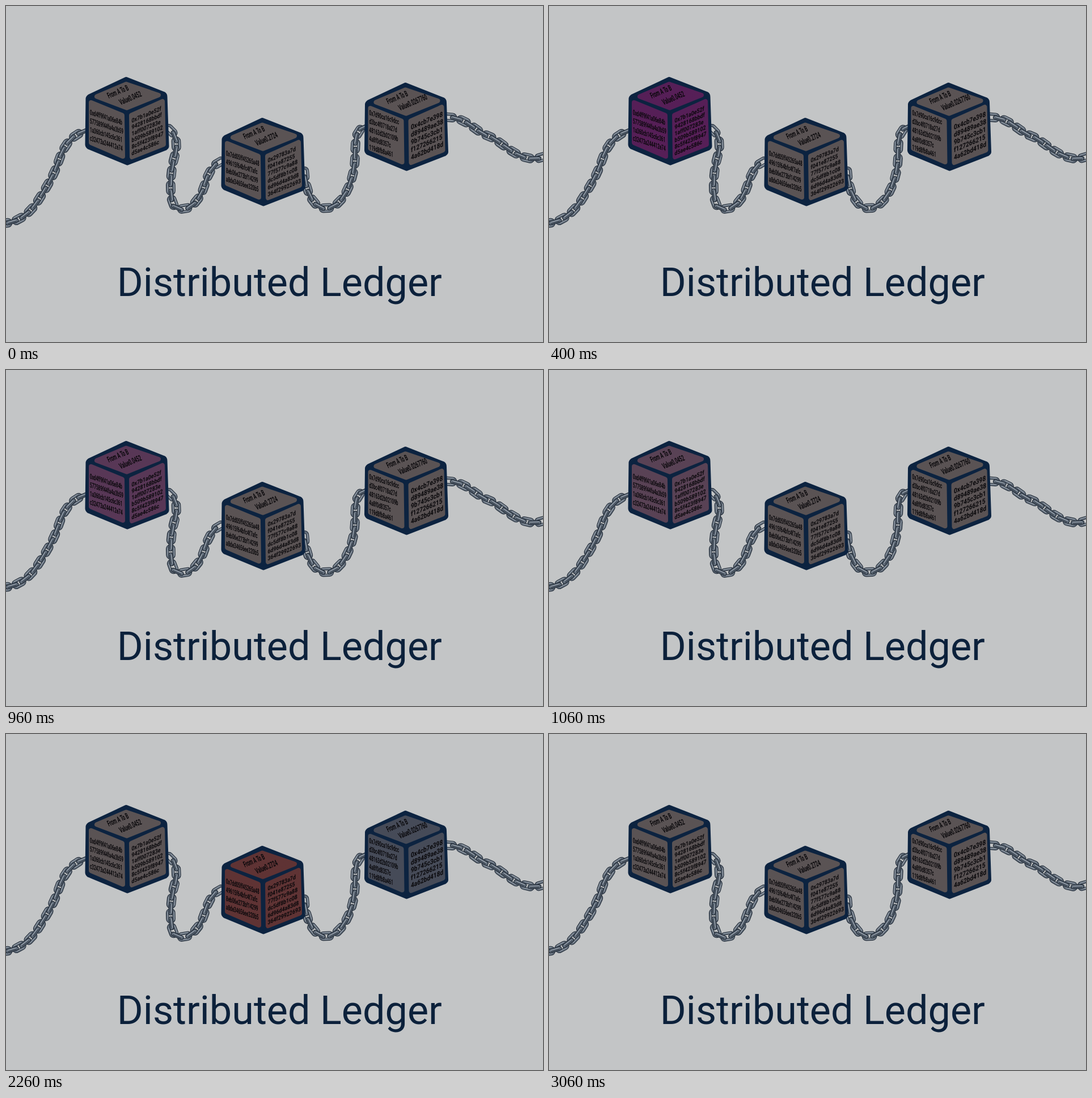
Animation of 947 by 592 pixels, one loop 3300 ms. Source, as an HTML page:

```html
<!DOCTYPE html>
<html lang="en">
<head>
<meta charset="utf-8">
<title>Distributed Ledger</title>
<style>
  html, body { margin: 0; width: 100%; height: 100%; overflow: hidden; background: #c3c5c6; }
  svg { display: block; }
  text { font-family: Roboto, sans-serif; }
  .title { font-size: 70.15px; fill: #0c213b; }
  .data { font-weight: 700; fill: #09080b; }
  .shell { fill: #0c2340; stroke: #0c2340; stroke-width: 7; stroke-linejoin: round; }
  .faces { stroke-width: 8; stroke-linejoin: round; }
  .link { fill: none; }
</style>
</head>
<body>
<svg id="stage" width="947" height="592" viewBox="0 0 947 592">
  <defs>
    <g id="flat" class="link">
      <rect x="-10.5" y="-5.6" width="21" height="11.2" rx="5" stroke="#202a36" stroke-width="5.4"/>
      <rect x="-10.5" y="-5.6" width="21" height="11.2" rx="5" stroke="#626d7a" stroke-width="3.4"/>
      <path d="M-7-6.2H7M-7 5H7" stroke="#a0a9b3"/>
    </g>
    <g id="edge">
      <rect x="-11.5" y="-3.3" width="23" height="6.6" rx="3.2" fill="#626d7a" stroke="#202a36" stroke-width="1.2"/>
      <path d="M-8-1.2H8" stroke="#a0a9b3"/>
      <path d="M-8 1.2H8" stroke="#202a36" stroke-width=".8"/>
    </g>
  </defs>
  <g id="chains"></g>
  <g id="cubes"></g>
  <text class="title" x="195.8" y="511">Distributed Ledger</text>
</svg>
<script>
const LOOP = 3300;
const GREY = [90, 83, 84];

const chains = [
  'M-8 383C24 382 44 363 59 339S84 299 93 273S114 228 143 219',
  'M286 216C303 228 302 248 297 266S289 310 291 330S297 358 313 357S343 338 350 316S366 276 386 272',
  'M526 290C528 326 542 357 565 356S606 325 613 290S608 220 636 212',
  'M776 196C812 196 826 220 850 229S895 267 930 269Q940 269 955 263'
];

// Each level step is [time in ms, strength of the glow].
const cubes = [
  {
    x: 0, y: 0, glow: [86, 26, 87],
    levels: [[200, .3], [300, .65], [400, .92], [530, 1], [860, .85], [910, .7], [960, .5], [1000, .3], [1160, 0]],
    top: ['From A To B', 'Value0.0452'],
    left: { y: 191.5, lines: ['0xd4ff9f41a06e84b', '577589f44fa4a3b59', '1a360cb145c6c361', 'c32473a244412e74'] },
    right: { y: 206, size: 10.7, pitch: 11.5,
      lines: ['0x7b1a0e52f', '9428168bbdf', '1aff007283e', 'b509b589102', '8c5f423f8947', 'd5ae4c586c'] }
  },
  {
    x: 240, y: 72, glow: [98, 29, 31],
    levels: [[1530, .1], [1560, .3], [1700, .8], [1860, 1], [2200, .8], [2260, .6], [2400, .2], [2460, 0]],
    top: ['From A To B', 'Value0.2724'],
    left: { y: 191.5, lines: ['0x7dd05ff45265a48', '49615f64bfc4f7afc', '8eb06e273bf14299', 'a8de34656ee320b5'] },
    right: { y: 204, size: 10.7, pitch: 12,
      lines: ['0x29783a7d', 'f041e87255', '77f577c9a88', 'dc5df8b1c08', '6d96d4a83d8', '364f29922693'] }
  },
  {
    x: 492.5, y: 10, glow: [39, 64, 94],
    levels: [[2200, .2], [2260, .4], [2400, .8], [2460, 1], [2930, .5], [3060, 0]],
    top: ['From A To B', 'Value0.0267760'],
    left: { y: 182, lines: ['0x7d90ca16c9dcc', 'd3bc4f0718a27d', '48163d2b02109b', '4a8f0d8357c', '119d8fb8a461'] },
    right: { y: 208, size: 12.3, pitch: 13.3,
      lines: ['0x4cb7e398', 'd89489ae38', '9b745c3cb1', 'f127266215', '4a62bd418d'] }
  }
];

function add(parent, tag, attrs, content = '') {
  const el = document.createElementNS('http://www.w3.org/2000/svg', tag);
  for (const key in attrs) el.setAttribute(key, attrs[key]);
  el.textContent = content;
  return parent.appendChild(el);
}

function drawChain(d) {
  const root = document.getElementById('chains');
  const path = add(root, 'path', { d, fill: 'none' });
  const length = path.getTotalLength();
  const place = (href, at) => {
    const p = path.getPointAtLength(at);
    const a = path.getPointAtLength(at - 4), b = path.getPointAtLength(at + 4);
    const angle = Math.atan2(b.y - a.y, b.x - a.x) * 180 / Math.PI;
    add(root, 'use', { href, transform: `translate(${p.x} ${p.y}) rotate(${angle})` });
  };
  for (let at = 6; at < length; at += 26) place('#flat', at);
  for (let at = 19; at < length; at += 26) place('#edge', at);
}

// Writes one line lying on a face; skew holds the first four matrix terms.
function write(parent, line, x, y, size, skew) {
  add(parent, 'text', { class: 'data', 'font-size': size, transform: `matrix(${skew} ${x} ${y})` }, line);
}

function drawCube(cube) {
  const g = add(document.getElementById('cubes'), 'g', { transform: `translate(${cube.x} ${cube.y})` });
  add(g, 'path', { class: 'shell', d: 'M212 128.5L278 154.5Q281 156 281 160L284 247Q284 249 281 251L214 277L146 249Q143 247 143 244L144 164Q144 161 147 159Z' });
  cube.faces = add(g, 'g', { class: 'faces' });
  for (const d of [
    'M212 137.5L269 157L213 179.5L160 159.5Z',
    'M150 170L205 192.5L206 265L150 241Z',
    'M221 192.5L276 168L278 244L222 266Z'
  ]) add(cube.faces, 'path', { d });

  cube.top.forEach((line, i) => write(g, line, 181.5 + i * 21, 163 + i * 11.5, 13, '.51 -.215 .5 1'));
  cube.left.lines.forEach((line, i) => write(g, line, 148, cube.left.y + i * 15.2, 13, '.49 .157 0 1'));
  const { y, size, pitch, lines } = cube.right;
  lines.forEach((line, i) => write(g, line, 221.5, y + i * pitch, size, '.82 -.347 0 1'));
}

function render() {
  const t = performance.now() % LOOP;
  for (const { faces, glow, levels } of cubes) {
    const level = levels.reduce((now, [start, value]) => t >= start ? value : now, 0);
    const color = `rgb(${GREY.map((c, i) => Math.round(c + (glow[i] - c) * level))})`;
    faces.setAttribute('fill', color);
    faces.setAttribute('stroke', color);
  }
  requestAnimationFrame(render);
}

chains.forEach(drawChain);
cubes.forEach(drawCube);
render();
</script>
</body>
</html>
```
